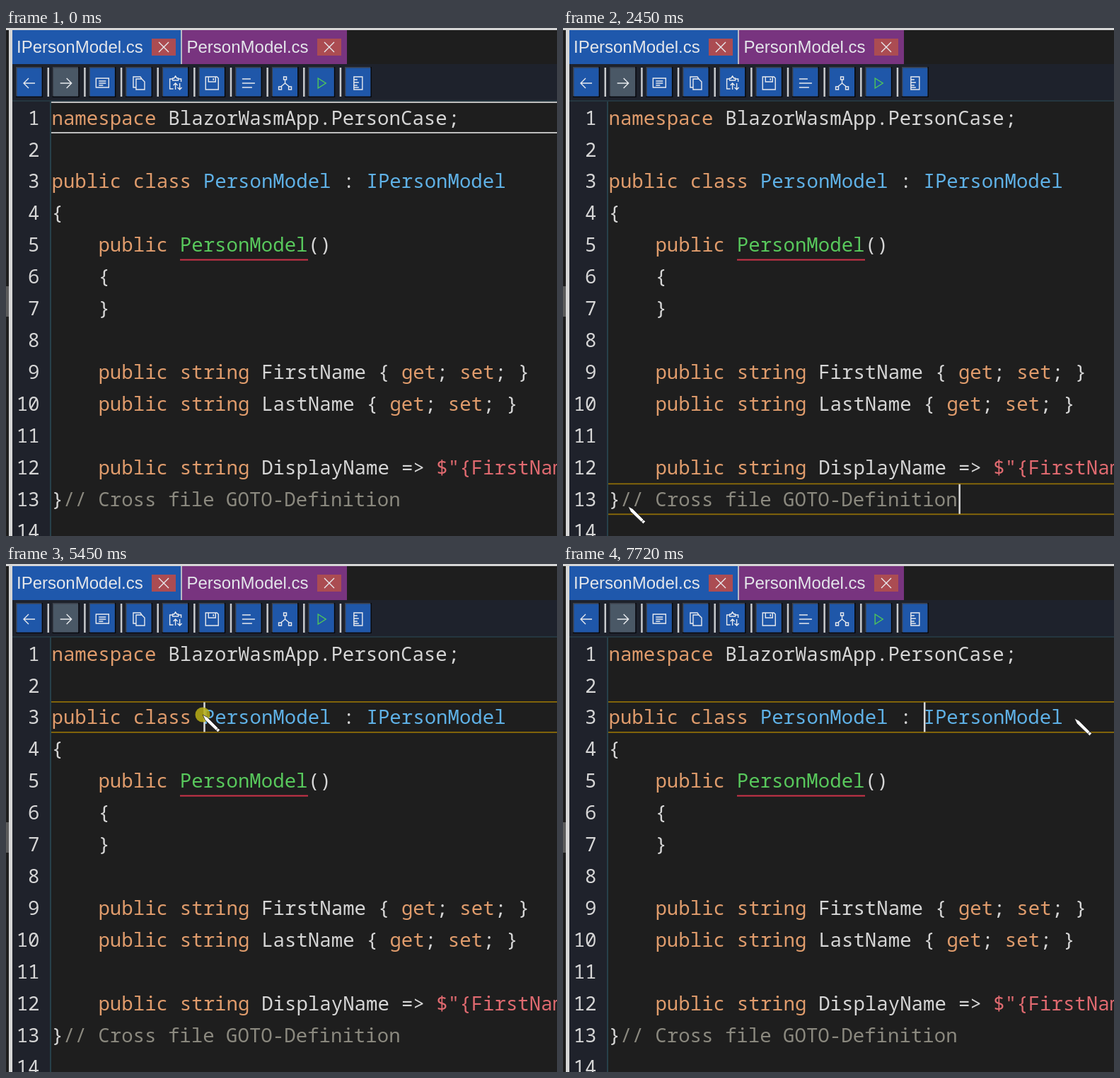
These frames come from a looping animation (779x718 px, 8 s). An HTML page:

```html
<!DOCTYPE html>
<html lang="en">
<head>
<meta charset="utf-8">
<title>Code editor</title>
<style>
  html, body { margin: 0; width: 100%; height: 100%; overflow: hidden; background: #1e1e1e; }
  svg { display: block; width: 100vw; height: 100vh; }
  .code { font: 500 27.4px "Noto Sans Mono", monospace; fill: #d6d6d6; }
  .tab { font: 24px "Liberation Sans", Arial, sans-serif; fill: #e4e6ea; }
  .comment { fill: #8b897f; }
  .string { fill: #e06a70; }
  .keyword { fill: #e09c6c; }
  .ctor { fill: #58c85c; }
  .type { fill: #5fb1e6; }
  .icon { fill: none; stroke: #e8eaee; stroke-width: 1.4; }
</style>
</head>
<body>
<svg id="stage" viewBox="0 0 779 718"></svg>
<script>
const LOOP = 8000, LEFT = 64.5, TOP = 105, CHAR = 16.48, ROW = 44.94, BLINK_ON = 1100, BLINK = 2200;
const stage = document.getElementById('stage');

function add(tag, attrs, text) {
  const node = document.createElementNS('http://www.w3.org/2000/svg', tag);
  set(node, attrs);
  if (text !== undefined) node.textContent = text;
  return stage.appendChild(node);
}
function set(node, attrs) {
  for (const key in attrs) node.setAttribute(key, attrs[key]);
}
const rect = (x, y, width, height, fill) => add('rect', { x, y, width, height, fill });
const colX = col => LEFT + col * CHAR;
const rowY = row => TOP + (row - 1) * ROW;

// Window frame, gutter and toolbar
rect(0, 0, 779, 718, '#1e1e1e');
rect(0, 365, 4, 43, '#5c5c5c');
rect(9, 51, 770, 53, '#1e222c');
rect(9, 104, 54, 614, '#1f222b');
rect(9, 102, 770, 2, '#25363f');
rect(62, 104, 2, 614, '#27404a');
rect(0, 0, 779, 3, '#d6d6d6');
rect(4, 3, 5, 715, '#d6d6d6');

function tab(x, width, color, textX, name, closeX) {
  rect(x, 3, width, 48, color);
  add('text', { x: textX, y: 35, class: 'tab' }, name);
  rect(closeX, 15, 34, 24, '#ab4c52');
  add('path', { d: `M${closeX + 10} 20l14 14m0 -14l-14 14`, class: 'icon' });
}
tab(9, 238, '#1f58ac', 15, 'IPersonModel.cs', 206);
tab(249, 233, '#78347f', 255.5, 'PersonModel.cs', 440);
rect(247, 3, 2, 48, '#b8b8c4');

const icons = [
  'M8 0H-8M-1 -7L-8 0L-1 7',
  'M-8 0H8M1 -7L8 0L1 7',
  'M-9 -7H9V6H-9ZM-5 -3H5M-5 0H5M-5 3H1',
  'M-4 -6H4L8 -2V9H-4ZM-4 6H-8V-9H2L4 -6',
  'M-3 8H-8V-6H-4M4 -6H8V-2M-4 -4V-7H-2L0 -10L2 -7H4V-4ZM0 9V0M-3 3L0 0L3 3M6 0V9M3 6L6 9L9 6',
  'M-9 -9H7L9 -7V9H-9ZM-5 -9V-2H5V-9M2 -7V-4',
  'M-9 -6H3M-9 0H9M-9 6H5',
  'M-2 -9H2V-5H-2ZM0 -5V0L-6 5M0 0L6 5M-9 5H-5V9H-9ZM5 5H9V9H5Z',
  'M-5 -7L6 0L-5 7Z',
  'M-6 -9H6V9H-6ZM-6 -5H-1M-6 -1H1M-6 3H-1M-6 6H1'
];
icons.forEach((d, i) => {
  const cx = 33 + i * 51.65;
  rect(cx - 19, 55, 38, 43, '#05070b');
  rect(cx - 19, 55, 36.5, 41.5, '#3c414b');
  rect(cx - 17.5, 56.5, 35, 40, i === 1 ? '#4a5866' : '#1f57a9');
  const icon = add('path', { d, class: 'icon', transform: `translate(${cx} 78)` });
  if (i === 8) icon.style.stroke = '#4fc65a';
  if (i < icons.length - 1) rect(cx + 25.5, 56, 2.5, 41, '#c8cacd');
});

const selection = rect(0, 0, 0, 42, '#1f5680');
const lineTop = rect(64, 0, 715, 1.8, '');
const lineBottom = rect(64, 0, 715, 1.8, '');

// Source code
const lines = [
  'namespace BlazorWasmApp.PersonCase;',
  '',
  'public class PersonModel : IPersonModel',
  '{',
  '    public PersonModel()',
  '    {',
  '    }',
  '',
  '    public string FirstName { get; set; }',
  '    public string LastName { get; set; }',
  '',
  '    public string DisplayName => $"{FirstName} {LastName}";',
  '}// Cross file GOTO-Definition',
  ''
];
const token = /(\/\/.*)|(\$".*)|\b(namespace|public|class|string|get|set)\b|(PersonModel(?=\())|(\bI?PersonModel\b)|[\w.]+|[^\w\s]/g;
const kinds = ['comment', 'string', 'keyword', 'ctor', 'type'];
lines.forEach((line, i) => {
  const y = rowY(i + 1) + 31.6;
  add('text', { x: 47.5, y, class: 'code', 'text-anchor': 'end' }, i + 1);
  for (const match of line.matchAll(token)) {
    const kind = kinds[match.slice(1).findIndex(Boolean)] || '';
    add('text', { x: colX(match.index), y, class: 'code ' + kind }, match[0]);
  }
});
rect(246, 326.6, 181, 2, '#cc3349');

const caret = rect(0, 0, 2.5, 42, '#d8d8d8');
const halo = add('circle', { r: 10.5, fill: '#b9ae16', 'fill-opacity': .85 });
const pen = add('path', {
  d: 'M0 0L6.5 3.5L24.5 21.5L21.5 24.8L3.5 7.5ZM18.5 22.5L22 19',
  fill: '#fff', stroke: '#111', 'stroke-width': .7, 'stroke-linejoin': 'round'
});

// Caret states; a click shows the halo for a moment
const states = [
  { time: 0, row: 1, col: 0, blinkFrom: 500 },
  { time: 1770, row: 13, col: 30, click: true },
  { time: 2800, row: 13, col: 1, selected: [1, 30], click: true },
  { time: 3770, row: 13, col: 30, click: true },
  { time: 5450, row: 3, col: 13, click: true },
  { time: 6270, row: 3, col: 24, selected: [13, 24], click: true },
  { time: 7090, row: 3, col: 27, click: true }
];

// Pointer waypoints: time, x, y
const route = [
  [0, 721, 722], [70, 721, 718], [450, 630, 650], [830, 565, 610], [1160, 525, 597],
  [1700, 585, 684], [1880, 585, 684], [2450, 92, 676], [2520, 92, 676], [2650, 80, 670],
  [3070, 80, 670], [3480, 547, 680], [3620, 595, 690], [3750, 611, 678], [4020, 611, 678],
  [4560, 495, 295], [4840, 339, 212], [5250, 278, 213], [5580, 278, 213], [6200, 461, 223],
  [6390, 461, 223], [6700, 506, 253], [7020, 510, 222], [7230, 510, 222],
  [7450, 600, 228], [7720, 723, 218], [8000, 723, 218]
];

const secant = (i, axis) => route[i] && route[i + 1]
  ? (route[i + 1][axis] - route[i][axis]) / (route[i + 1][0] - route[i][0]) : 0;
function tangent(i, axis) {
  const a = secant(i - 1, axis), b = secant(i, axis);
  return a * b > 0 ? 2 * a * b / (a + b) : 0;
}
// Monotone cubic, so the pointer rests exactly between equal waypoints
function pointer(time, axis) {
  const i = Math.max(0, route.findIndex(p => p[0] > time) - 1);
  const span = route[i + 1][0] - route[i][0], u = (time - route[i][0]) / span, v = 1 - u;
  return route[i][axis] * (1 + 2 * u) * v * v + route[i + 1][axis] * u * u * (3 - 2 * u)
    + span * u * v * (tangent(i, axis) * v - tangent(i + 1, axis) * u);
}

function draw(time) {
  const state = states.filter(s => s.time <= time).pop();
  const y = rowY(state.row), x = pointer(time, 1), py = pointer(time, 2);
  const fill = state.row === 1 ? '#cfcfcf' : '#8c6c08';
  set(lineTop, { y: y - .9, fill });
  set(lineBottom, { y: y + 42.1, fill });

  const [from, to] = state.selected || [0, 0];
  set(selection, { x: colX(from), y: y + .5, width: (to - from) * CHAR });

  const age = time - (state.blinkFrom ?? state.time);
  const lit = age >= 0 && age % BLINK < BLINK_ON;
  set(caret, { x: colX(state.col) + .5, y: y + .5, visibility: lit ? 'visible' : 'hidden' });

  const pressed = state.click && time - state.time < 120;
  set(halo, { cx: x, cy: py, visibility: pressed ? 'visible' : 'hidden' });
  set(pen, { transform: `translate(${x} ${py})` });
}

function tick() {
  draw(performance.now() % LOOP);
  requestAnimationFrame(tick);
}
tick();
</script>
</body>
</html>
```
